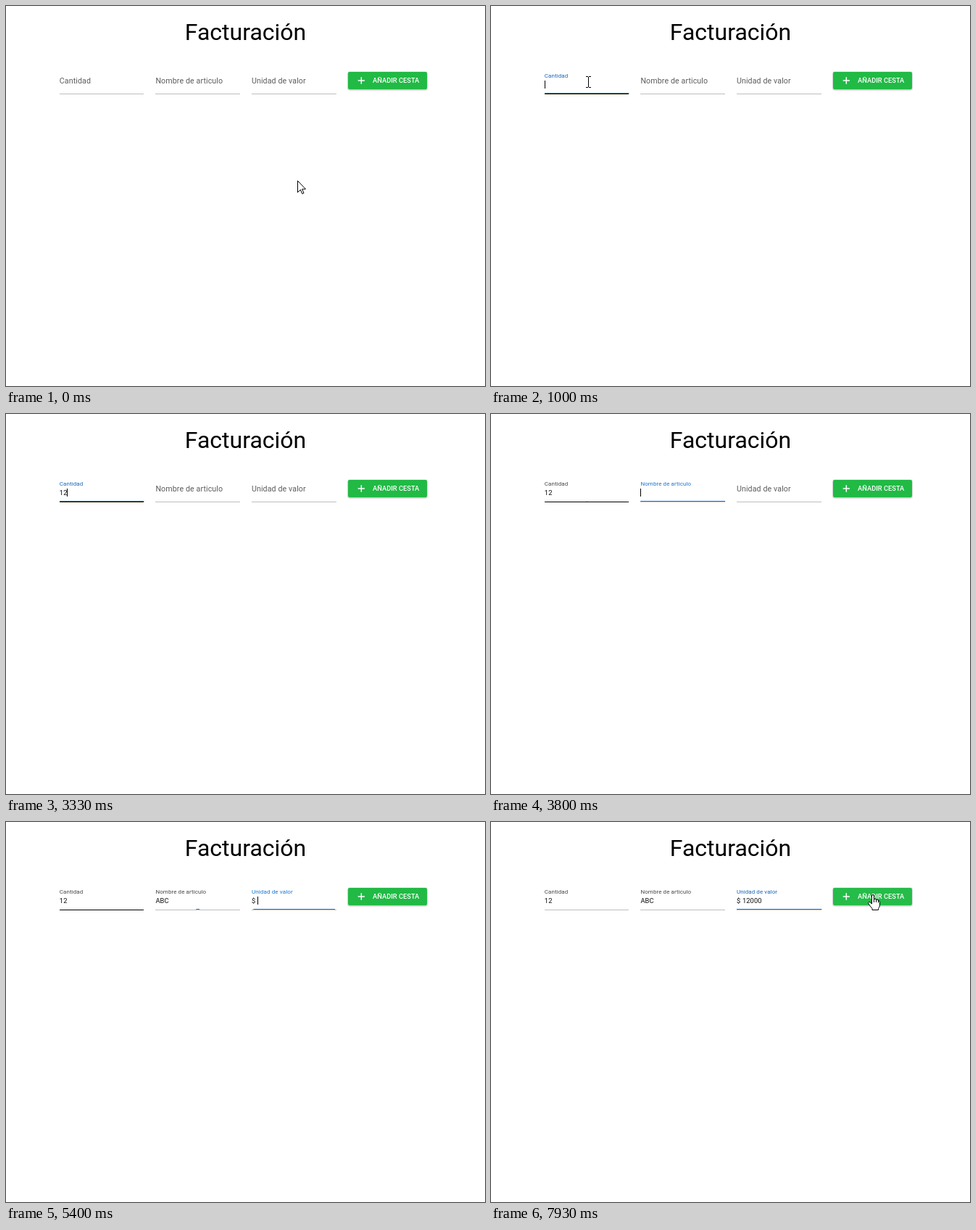
Animation, 661 px wide and 525 px high, one loop 8000 ms. Source, as an HTML page:

```html
<!DOCTYPE html>
<html lang="es">
<head>
<meta charset="utf-8">
<title>Facturación</title>
<style>
html, body { margin: 0; width: 100%; height: 100%; overflow: hidden; background: #fff; }
svg { display: block; width: 661px; height: 525px; font-family: Roboto, sans-serif; }
.label { font-size: 10.667px; letter-spacing: .00937em; }
.value { font-size: 9.333px; letter-spacing: .00937em; fill: #0c0c0c; }
.button { filter: drop-shadow(0 1px 1px rgba(0,0,0,.28)) drop-shadow(0 0 1px rgba(0,0,0,.14)); }
.cursor path { stroke: #000; }
</style>
</head>
<body>
<svg id="stage" viewBox="0 0 661 525">
  <rect width="661" height="525" fill="#fff"/>
  <text x="330.5" y="47" font-size="32" text-anchor="middle">Facturación</text>
  <g id="form"></g>
  <rect class="button" x="472" y="91" width="109" height="24" rx="2" fill="#21ba45"/>
  <rect id="glow" x="472" y="91" width="109" height="24" rx="2" fill="#fff"/>
  <path d="M485.7 103H495M490.33 98.33V107.67" stroke="#fff" stroke-width="1.5"/>
  <text x="506" y="106" font-size="9.333" font-weight="500" fill="#fff">AÑADIR CESTA</text>
  <rect id="caret" y="103" width="1" height="11"/>
  <g id="arrow" class="cursor">
    <path fill="#fff" d="M.5 .5V16.5L4.3 12.8L6.8 18.5L9 17.5L6.6 12H11.5Z"/>
  </g>
  <g id="beam" class="cursor">
    <path fill="none" d="M-3-7.5H0M1-7.5H4M.5-7V7M-3 7.5H0M1 7.5H4"/>
  </g>
  <g id="hand" class="cursor">
    <path fill="#fff" d="M-.5 13V2Q-.5 .5 1 .5T2.5 2V7Q3 6 4.2 6.2Q5.5 6.4 5.5 8Q6 7 7.2 7.2Q8.5 7.5 8.5 9Q10.5 8.3 10.5 10.5V15Q10.5 17 8.5 19.5V21.5H0V19.5Q-3 16-5 13Q-6 11-4.5 10.5Q-3 10.3-.5 13Z"/>
    <path fill="none" d="M2.5 7V11M5.5 8V11M8.5 9V11.5"/>
  </g>
</svg>
<script>
const LOOP = 8000, STEP = 200 / 3, FADE = 360;
const $ = id => document.getElementById(id);

const clamp = v => Math.min(1, Math.max(0, v));
const lerp = (a, b, p) => a + (b - a) * p;
const smooth = p => p * p * (3 - 2 * p);

// cubic-bezier(.4, 0, .2, 1)
function ease(x) {
  if (x <= 0) return 0;
  if (x >= 1) return 1;
  let lo = 0, hi = 1, u;
  for (let i = 0; i < 24; i++) {
    u = (lo + hi) / 2;
    const bx = 1.2 * u * (1 - u) ** 2 + .6 * u * u * (1 - u) + u ** 3;
    if (bx < x) lo = u; else hi = u;
  }
  return u * u * (3 - 2 * u);
}

function add(parent, tag, attrs, text = '') {
  const el = document.createElementNS('http://www.w3.org/2000/svg', tag);
  set(el, attrs);
  el.textContent = text;
  return parent.appendChild(el);
}

function set(el, attrs) {
  for (const k in attrs) el.setAttribute(k, attrs[k]);
}

const fields = [
  { name: 'Cantidad', x: 73.8, left: 74, width: 116, focus: 620, blur: 3470,
    keys: [[1470, '1'], [2130, ''], [2670, '1'], [2730, '12']] },
  { name: 'Nombre de articulo', x: 206.4, left: 206, width: 117, focus: 3470, blur: 5130,
    keys: [[4330, 'A'], [4600, 'AB'], [4730, 'ABC']] },
  { name: 'Unidad de valor', x: 338.9, left: 339, width: 117, focus: 5130, blur: Infinity, prefix: '$',
    keys: [[5670, '1'], [5730, '12'], [6000, '120'], [6200, '1200'], [6670, '12000']] }
];
const caretOff = [[1200, 1470], [1730, 2130], [2270, 2670], [2800, 3330], [4000, 4330], [6730, 7270], [7800, LOOP]];
const hover = [500, 7340];

for (const f of fields) {
  const form = $('form');
  f.line = add(form, 'rect', { x: f.left, y: 121, width: f.width, height: 1 });
  f.bar = add(form, 'rect', { y: 120, height: 1, fill: '#1976d2' });
  f.label = add(form, 'text', { class: 'label', y: 10.33 }, f.name);
  if (f.prefix) f.sign = add(form, 'text', { class: 'value', x: f.x, y: 112 }, f.prefix);
  f.valueX = f.x + (f.prefix ? 8 : 0);
  f.value = add(form, 'text', { class: 'value', x: f.valueX, y: 112 });
}

function drawField(f, now, t) {
  const lift = ease((t - f.focus) / FADE);
  const grow = lift - ease((t - f.blur) / FADE);
  const focused = now >= f.focus && now < f.blur;
  const moving = lift > 0 && lift < .994 || now > f.focus && now < f.focus + FADE - 20;
  const top = 96.67 - 5.33 * lift - (moving ? .5 * lift : 0);
  const idle = lift ? '#464646' : '#5c5c5c';
  set(f.label, {
    transform: `translate(${f.x} ${top}) scale(${1 - .25 * lift})`,
    fill: focused ? (moving ? '#1976d2' : '#1565b8') : idle
  });
  const w = (f.width + .4) * grow;
  set(f.bar, { x: f.left + (f.width + .4 - w) / 2, width: w });

  const dark = f === fields[0] ? ease((t - hover[0]) / FADE) - ease((t - hover[1]) / FADE) : 0;
  set(f.line, { 'fill-opacity': lerp(.25, 1, dark) });

  let text = '';
  for (const [at, s] of f.keys) if (now >= at) text = s;
  if (f.value.textContent !== text) f.value.textContent = text;
  if (f.sign) set(f.sign, { opacity: lift });

  if (focused) {
    const w = text ? f.value.getComputedTextLength() : 0;
    set($('caret'), { x: Math.round(f.valueX + w) });
  }
}

function pointer(now, t) {
  if (now < 1470) {
    const p = smooth(clamp((t - 40) / 560));
    return [lerp(402, 134, p), lerp(241, 105, p)];
  }
  if (now < 7330) return null;
  const p = smooth(clamp((t - 7290) / 600));
  return [lerp(134, 526, p), lerp(105, 100, p) - 31 * Math.sin(Math.PI * p)];
}

function shape([x, y]) {
  if (x >= 472 && x < 581 && y >= 91 && y < 115) return 'hand';
  const inside = f => x >= f.left && x < f.left + f.width;
  return y >= 85 && y < 122 && fields.some(inside) ? 'beam' : 'arrow';
}

function draw(ms) {
  // the screen refreshes fifteen times a second
  const t = Math.floor((ms + 4) / STEP) * STEP;
  const now = t + 5;
  for (const f of fields) drawField(f, now, t);

  const blink = caretOff.some(([a, b]) => now >= a && now < b);
  set($('caret'), { opacity: now < fields[0].focus || blink ? 0 : 1 });
  set($('glow'), { opacity: .15 * ease((t - 7850) / 400) });

  const at = pointer(now, t);
  const kind = at && shape(at);
  for (const id of ['arrow', 'beam', 'hand']) {
    set($(id), { visibility: id === kind ? 'visible' : 'hidden' });
    if (id === kind) set($(id), { transform: `translate(${at.map(Math.round)})` });
  }
}

const start = performance.now();
function tick() {
  draw((performance.now() - start) % LOOP);
  requestAnimationFrame(tick);
}
tick();
</script>
</body>
</html>
```
